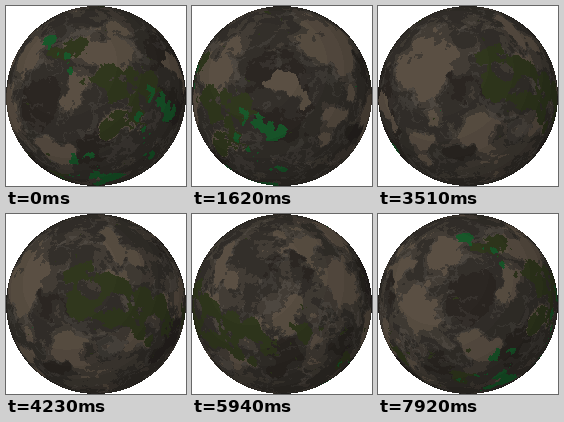
Write an HTML page with a canvas that moves like this. It is 180 px wide and 180 px high and loops after 8 s.

```html
<!DOCTYPE html>
<html lang="en">
<head>
<meta charset="utf-8">
<title>Rotating planet</title>
<style>
  html, body { margin: 0; width: 100%; height: 100%; overflow: hidden; background: #fff; }
  canvas { display: block; width: 100vw; height: 100vh; image-rendering: pixelated; }
</style>
</head>
<body>
<canvas id="planet" width="180" height="180"></canvas>
<script>
const SIZE = 180, CENTER = 90, RADIUS = 90;
const LOOP = 8000, STEP = 90, TURN = 9000;
const MAP_W = 600, MAP_H = 300;
const ROLL = 0.24;
const TAU = Math.PI * 2;

// Regions [x, y, radius], placed on the disc as it faces the viewer at the given time.
const REGIONS = [
  { at: 0,
    land: [[98, 45, 28], [69, 95, 16], [22, 50, 14]],
    sea: [[42, 98, 20], [90, 142, 24]],
    moss: [[74, 41, 7], [100, 76, 8], [130, 75, 10], [125, 114, 8]],
    glow: [[45, 38, 5], [147, 120, 5], [80, 170, 5]] },
  { at: 810,
    land: [[138, 75, 11], [76, 130, 12]],
    sea: [[117, 60, 15], [150, 122, 19]],
    moss: [[50, 92, 8]],
    glow: [] },
  { at: 2340,
    land: [[105, 42, 28], [45, 91, 14], [82, 143, 15], [115, 115, 13]],
    sea: [[62, 76, 13], [50, 119, 18], [132, 130, 14]],
    moss: [],
    glow: [[140, 92, 4]] },
  { at: 3510,
    land: [[95, 130, 20]],
    sea: [[87, 80, 13]],
    moss: [[120, 62, 17]],
    glow: [] },
  { at: 4860,
    land: [[85, 52, 16], [98, 138, 12], [150, 84, 14]],
    sea: [[145, 38, 15], [142, 130, 17]],
    moss: [[60, 90, 16], [100, 98, 17], [114, 122, 13]],
    glow: [] },
  { at: 7020,
    land: [[45, 55, 22], [96, 84, 22]],
    sea: [[142, 78, 24], [106, 140, 18]],
    moss: [[65, 130, 15]],
    glow: [[150, 38, 7], [140, 160, 5]] },
  { at: 7920,
    land: [[102, 132, 19]],
    sea: [],
    moss: [[108, 42, 11], [90, 157, 9]],
    glow: [] }
];

const COLORS = [
  [43, 38, 34],  // deep
  [51, 47, 42],  // sea
  [66, 60, 53],  // shore
  [90, 79, 67],  // land
  [48, 55, 29],  // moss
  [24, 88, 42]   // glow
];
const LAND = 3, MOSS = 4, GLOW = 5, WISP = 6;

let seed = 71;
const random = () => (seed = (seed * 16807) % 2147483647) / 2147483647;
const lattice = Float32Array.from({ length: 4096 }, () => random() * 2 - 1);
const mix = (a, b, k) => a + (b - a) * k;
const smooth = k => k * k * (3 - 2 * k);
const cell = (x, y, z) => lattice[(x * 1619 + y * 3137 + z * 6971) & 4095];

function noise(x, y, z) {
  const i = Math.floor(x), j = Math.floor(y), k = Math.floor(z);
  const u = smooth(x - i), v = smooth(y - j), w = smooth(z - k);
  const edge = (b, c) => mix(cell(i, b, c), cell(i + 1, b, c), u);
  return mix(mix(edge(j, k), edge(j + 1, k), v),
             mix(edge(j, k + 1), edge(j + 1, k + 1), v), w);
}

function fractal(x, y, z, octaves) {
  let sum = 0, gain = 0.55;
  for (let n = 0; n < octaves; n++, gain *= 0.5) {
    sum += gain * noise(x, y, z);
    x = x * 2.03 + 7.1; y = y * 2.03 + 3.7; z = z * 2.03 + 5.3;
  }
  return sum;
}

const angleAt = time => time / TURN * TAU;

// Disc position to longitude and height along the leaning axis.
function toGlobe(px, py) {
  const x = (px - CENTER) / RADIUS, y = (CENTER - py) / RADIUS;
  const z = Math.sqrt(Math.max(0, 1 - x * x - y * y));
  const c = Math.cos(ROLL), s = Math.sin(ROLL);
  return { lon: Math.atan2(x * c + y * s, z), up: y * c - x * s, x, y, z };
}

function direction(lon, up) {
  const ring = Math.sqrt(Math.max(0, 1 - up * up));
  return [ring * Math.sin(lon), up, ring * Math.cos(lon)];
}

function gather(kind) {
  return REGIONS.flatMap(view => view[kind].map(([x, y, r]) => {
    const { lon, up } = toGlobe(x, y);
    return { dir: direction(lon + angleAt(view.at), up), size: (r / RADIUS) ** 2 };
  }));
}

function influence(spots, x, y, z) {
  let sum = 0;
  for (const { dir, size } of spots) {
    const d = (2 - 2 * (dir[0] * x + dir[1] * y + dir[2] * z)) / size;
    if (d < 5) sum += Math.exp(-d);
  }
  return sum;
}

function buildMap() {
  const land = gather('land'), sea = gather('sea');
  const moss = gather('moss'), glow = gather('glow');
  const map = new Uint8Array(MAP_W * MAP_H);
  for (let row = 0; row < MAP_H; row++) {
    const up = Math.cos((row + 0.5) / MAP_H * Math.PI);
    for (let col = 0; col < MAP_W; col++) {
      const [x, y, z] = direction(col / MAP_W * TAU, up);
      const a = fractal(x * 5, y * 5, z * 5, 4);
      const b = fractal(x * 5 + 31, y * 5 + 17, z * 5, 4);
      const wx = x + a * 0.13, wy = y + b * 0.13, wz = z + (a - b) * 0.1;
      const rough = fractal(wx * 5, wy * 6, wz * 5, 4);
      const height = influence(land, wx, wy, wz) - influence(sea, wx, wy, wz) + rough * 0.55;
      let type = height > 0.3 ? LAND : height > 0.08 ? 2 : height > -0.4 ? 1 : 0;

      const growth = fractal(wx * 9 + 50, wy * 9, wz * 9, 3);
      const bright = influence(glow, wx, wy, wz);
      if (influence(moss, wx, wy, wz) + bright * 0.4 + growth * 0.75 > 0.46) type = MOSS;
      if (bright * (0.7 + growth) > 0.5) type = GLOW;

      const swirl = fractal(wx * 2.5 + a, wy * 5 + b, wz * 2.5 + 20, 2);
      const wisp = type < LAND && Math.abs(swirl - 0.1) < 0.06 && b > -0.12;
      map[row * MAP_W + col] = type + (wisp ? WISP : 0);
    }
  }
  return map;
}

function buildDisc() {
  const pixels = [];
  for (let py = 0; py < SIZE; py++) {
    for (let px = 0; px < SIZE; px++) {
      if (Math.hypot(px + 0.5 - CENTER, py + 0.5 - CENTER) > RADIUS) continue;
      const { lon, up, x, y, z } = toGlobe(px + 0.5, py + 0.5);
      const row = Math.min(MAP_H - 1, Math.floor(Math.acos(Math.max(-1, Math.min(1, up))) / Math.PI * MAP_H));
      const lit = 0.74 + 0.28 * Math.max(0, z * 0.87 - x * 0.35 + y * 0.35);
      const rim = z < 0.15 ? 0.85 : 1;
      pixels.push({ at: (py * SIZE + px) * 4, row: row * MAP_W, lon, light: Math.round(lit * rim * 18) / 18 });
    }
  }
  return pixels;
}

const context = document.getElementById('planet').getContext('2d');
const image = context.createImageData(SIZE, SIZE);
const map = buildMap(), disc = buildDisc();
let shown = -1;

function draw(step) {
  const turn = angleAt(step * STEP) + TAU;
  for (const { at, row, lon, light } of disc) {
    const col = Math.floor((lon + turn) / TAU * MAP_W) % MAP_W;
    const type = map[row + col];
    const color = COLORS[type % WISP], lift = type >= WISP ? 11 : 0;
    for (let c = 0; c < 3; c++) image.data[at + c] = (color[c] + lift) * light;
    image.data[at + 3] = 255;
  }
  context.putImageData(image, 0, 0);
}

function tick() {
  const step = Math.floor(performance.now() % LOOP / STEP);
  if (step !== shown) draw(shown = step);
  requestAnimationFrame(tick);
}
tick();
</script>
</body>
</html>
```
